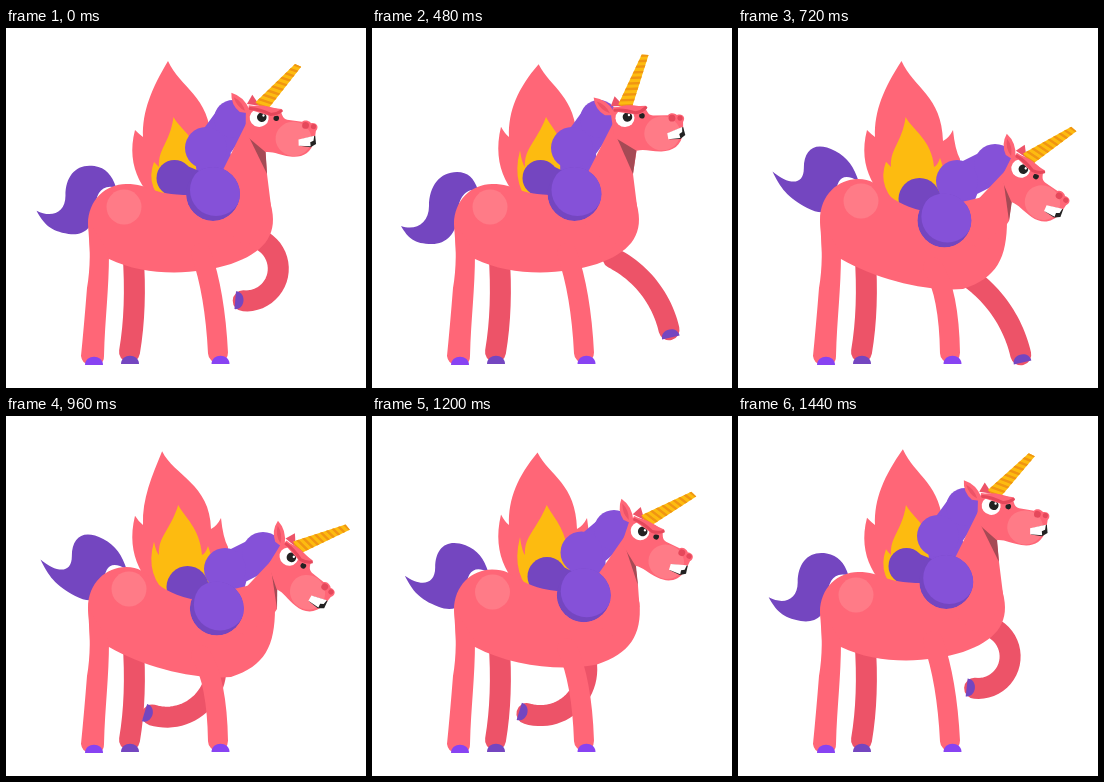
An HTML page with a canvas for the animation above (1.5 s loop, 360 by 360 pixels).

```html
<!DOCTYPE html>
<html>
<head>
<meta charset="utf-8">
<style>
  html, body { margin: 0; height: 100%; overflow: hidden; background: #fff; }
  canvas { display: block; }
</style>
</head>
<body>
<canvas id="stage" width="360" height="360"></canvas>
<script>
const ctx = document.getElementById('stage').getContext('2d');
const LOOP = 1500, STEP = 60;
const PINK = '#ff6677', ROSE = '#ed5368', BLUSH = '#ff7b87', BROW = '#e5485b', SHADE = '#a54a55';
const PURPLE = '#7446c0', VIOLET = '#8551d8', HOOF = '#8843f2', GOLD = '#fdbb10', AMBER = '#f09512';

const { sin, cos, PI } = Math;
const rad = deg => deg * PI / 180;

function fill(color, d) {
  ctx.fillStyle = color;
  ctx.fill(new Path2D(d));
}
function line(color, width, d) {
  ctx.strokeStyle = color;
  ctx.lineWidth = width;
  ctx.stroke(new Path2D(d));
}
function oval(color, x, y, rx, ry = rx) {
  ctx.fillStyle = color;
  ctx.beginPath();
  ctx.ellipse(x, y, rx, ry, 0, 0, 7);
  ctx.fill();
}
function place(x, y, deg, draw) {
  ctx.save();
  ctx.translate(x, y);
  ctx.rotate(rad(deg));
  draw();
  ctx.restore();
}
const hoof = (color, x, y, deg = 90) =>
  place(x, y, deg, () => fill(color, 'M8 -9C-3 -9 -3 9 8 9Z'));

// The head lifts, stomps down, holds and rises again; the foreleg reaches, tucks and returns.
function poseAt(t) {
  const ease = (from, to) => {
    const u = Math.min(1, Math.max(0, (t - from) / (to - from)));
    return u * u * (3 - 2 * u);
  };
  const turn = 2 * PI * t / LOOP;
  const lift = sin(PI * Math.min(1, t / 480));
  const stomp = ease(480, 720), rise = ease(960, LOOP);
  const reach = ease(240, 720), tuck = ease(720, 960), back = ease(1140, 1440);
  return {
    drop: stomp - ease(960, 1440) - .1 * lift,
    tail: .28 * (1 - ease(0, 240)) + stomp - .72 * rise,
    tilt: 8 - 9 * ease(0, 360) + 35 * stomp + 5 * tuck - 31 * rise,
    horn: -61 - 7 * sin(turn - .84),
    maneX: 207 - 5 * sin(turn),
    flicker: 2 * turn,
    leg: {
      x: 250 - 18 * reach - 22 * tuck + 40 * back,
      y: 210 + 40 * (reach - back) - 6 * lift,
      hip: 18 + 18 * reach + 52 * tuck - 70 * back,
      foot: 185 - 108 * ease(60, 480) + 120 * tuck - 12 * ease(1200, LOOP),
      length: 94 - 12 * lift
    }
  };
}

// The tip swings up while the root stays
function drawTail(s) {
  ctx.save();
  ctx.transform(1 + .12 * s, .6 * s, 0, 1, 2 * s, -72 * s);
  fill(PURPLE, `M29 198C43 203 57 196 57 178C57 158 68 144 85 144C96 144 102 150 106 162
    C92 160 86 172 86 186C85 206 74 216 60 216C42 216 36 210 29 198Z`);
  ctx.restore();
}

function drawWing(phase) {
  const s = sin(phase), c = cos(phase);
  const x = 162 - 6 * s, y = 35 - 2 * c, flameX = 171.5 - 4 * c;
  fill(PINK, `M165 185C138 168 119 140 129 ${100 + 2 * c}Q133 106 137 109
    C136 83 146 60 ${x} ${y}C${x + 12} 60 204 68 205 113Q211 110 215 102
    Q217 122 222 131L220 185Z`);
  fill(GOLD, `M165 182Q138 160 148 ${127 + 7 * c}Q150 136 153 139
    C152 120 164 115 ${flameX} 89C${flameX + 6} 101 194 112 196 139
    Q200 137 202 130Q210 150 205 185Z`);
}

// A bending tube: the heading turns evenly from hip to foot
function drawForeleg({ x, y, hip, foot, length }) {
  const parts = 24;
  let path = `M${x} ${y}`;
  for (let i = 0; i < parts; i++) {
    const angle = rad(hip + (foot - hip) * (i + .5) / parts);
    x += cos(angle) * length / parts;
    y += sin(angle) * length / parts;
    path += `L${x} ${y}`;
  }
  line(ROSE, 21, path);
  hoof(PURPLE, x, y, foot);
}

function drawBody(d) {
  fill(PINK, `M82 ${196 - 4 * d}C82 ${172 - 5 * d} 100 ${156 - 5 * d} 120 ${156 - 5 * d}
    C146 ${156 - 5 * d} 142 ${167 + 6 * d} 185 ${167 + 16 * d}L262 165
    L${266 + 3 * d} ${182 + 10 * d}C${271 - 2 * d} ${208 + 22 * d} ${257 + 2 * d} ${225 + 25 * d} 225 ${236 + 25 * d}
    C190 ${247 + 17 * d} 140 ${249 + 3 * d} 103 231L84 225Z`);
  fill(PINK, 'M82 192Q86 232 81 260Q78 298 75 328Q76 335 82 336L94 336Q98 334 98 328C99 290 103 262 103 225Z');
  oval(BLUSH, 118 + 5 * d, 179 - 6 * d, 17.5);
  line(PINK, 20, `M195 ${225 + 14 * d}Q${209 + 2 * d} 265 212 325`);
  hoof(HOOF, 88, 329);
  hoof(HOOF, 214.5, 328);
}

function drawHorn() {
  const cone = new Path2D('M0 -7L55 -3.5L57 3L0 7Z');
  ctx.fillStyle = GOLD;
  ctx.fill(cone);
  ctx.clip(cone);
  for (let x = -2; x < 58; x += 6) line(AMBER, 2.4, `M${x} -8L${x + 7} 8`);
}

function drawHead(horn) {
  fill(ROSE, 'M-15 -13L-11 -23L-2 -13Z');
  place(-1, -12, horn, drawHorn);
  fill(PINK, `M-15 -5C-12 -15 4 -15 18 -12C22 -8 21 -4 27 -3L42 -3
    C45 -7 51 -4 51 -3C57 -5 60 0 57 4L57 14C55 28 46 33 35 33
    C24 33 18 30 10 32L-12 18Z`);
  oval(BLUSH, 36, 15, 18, 17);
  fill(PINK, 'M-14 -4L-21 -4Q-31 -10 -32 -22Q-19 -20 -12 -8Z');
  fill(ROSE, 'M-16 -6Q-25 -9 -29 -18Q-20 -15 -16 -6Z');

  oval('#fff', -1, -1, 9.5, 9);
  oval('#222', 1.5, -2, 4.8);
  oval('#fff', 3, -4, 1.2);
  oval('#222', 16, -3, 2.8);
  fill(PINK, 'M-13 -12L20 -13L20 -7L12 -4L-13 -8Z');
  line(BROW, 3, 'M-11 -9Q-2 -10 10 -6Q16 -7 20 -11');

  oval(BROW, 46, 0, 3.4);
  oval(BROW, 54, 0, 2.6);
  fill('#222', 'M42 15L57 9L59 17L54 21L43 21Z');
  fill('#fff', 'M41 15L56 9L56 14L53 16L54 20L42 21Z');
}

function drawMane(d, x) {
  const midX = 200 + 19 * d, midY = 120 + 33 * d;
  const topX = 227 + 30 * d, topY = 91 + 46 * d;
  const lowX = 168.5 + 13 * d, lowY = 150 + 21 * d, curlY = 166 + 26.5 * d;
  line(VIOLET, 36, `M${topX} ${topY}L${midX + 6} ${midY}L${x + 4} ${curlY - 2}`);
  oval(VIOLET, topX, topY, 19 + 2 * d);
  oval(VIOLET, midX, midY, 21);
  line(PURPLE, 32, `M${lowX} ${lowY}L${x} ${curlY}`);
  oval(PURPLE, lowX, lowY, 18 + 3 * d);
}

function drawCurl(x, y) {
  ctx.save();
  ctx.beginPath();
  ctx.arc(x, y, 27, 0, 7);
  ctx.clip();
  ctx.fillStyle = PURPLE;
  ctx.fill();
  oval(VIOLET, x + 3, y - 4, 26);
  ctx.restore();
}

function draw(t) {
  const p = poseAt(t), d = p.drop;
  const eyeX = 254 + 29 * d, eyeY = 91 + 51 * d, tilt = rad(p.tilt);
  const onHead = (x, y) =>
    `${eyeX + x * cos(tilt) - y * sin(tilt)} ${eyeY + x * sin(tilt) + y * cos(tilt)}`;
  const throat = `${261 + 10 * d} ${146 + 47 * d}`;

  ctx.fillStyle = '#fff';
  ctx.fillRect(0, 0, 360, 360);
  ctx.lineCap = 'round';
  drawTail(p.tail);
  line(ROSE, 21, 'M127 225Q131 280 123.5 324');
  hoof(PURPLE, 124, 328);
  drawForeleg(p.leg);
  drawWing(p.flicker);
  drawMane(d, p.maneX);
  drawBody(d);
  fill(PINK, `M${onHead(-11, 0)}L${215 + 13 * d} ${146 + 38 * d}L205 ${190 + 10 * d}
    L240 220L${266 + 3 * d} ${186 + 10 * d}L${throat}L${onHead(10, 32)}Z`);
  fill(SHADE, `M${onHead(-10, 17)}L${onHead(10, 31)}L${throat}Z`);
  drawCurl(p.maneX, 166 + 26.5 * d);
  place(eyeX, eyeY, p.tilt, () => drawHead(p.horn));
}

function frame() {
  draw(Math.floor(performance.now() % LOOP / STEP) * STEP);
  requestAnimationFrame(frame);
}
frame();
</script>
</body>
</html>
```
